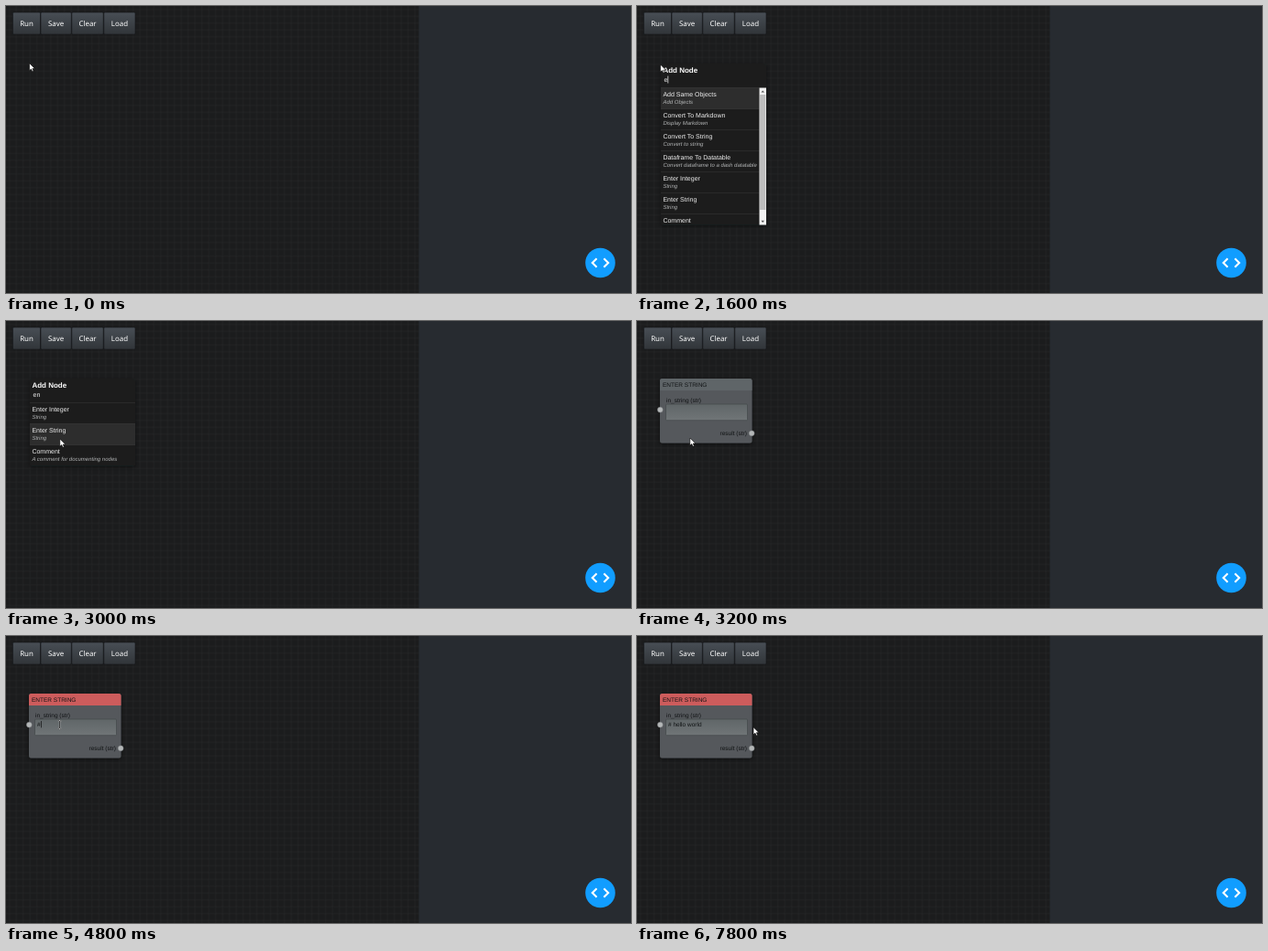
Animation of 682x314 px, one loop 8000 ms. Source, as an HTML page:

```html
<!DOCTYPE html>
<html lang="en">
<head>
<meta charset="utf-8">
<title>Node editor</title>
<style>
  html, body { margin: 0; width: 100%; height: 100%; overflow: hidden; background: #1b1c1d; }
  svg { display: block; width: 682px; height: 314px; }
  text { font: 7px "Liberation Sans", Arial, sans-serif; fill: #f0f0f0; text-rendering: geometricPrecision; white-space: pre; }
  .btn { font: 7.9px "Noto Sans", sans-serif; fill: #fff; text-anchor: middle; }
  .title { font-size: 8px; font-weight: bold; fill: #fff; }
  .hint { font-style: italic; fill: #6b6d6e; }
  .desc { font-size: 6px; font-style: italic; fill: #b2b4b5; }
  .node text { font-size: 6.5px; fill: #101314; }
  .hidden { display: none; }
</style>
</head>
<body>
<svg viewBox="0 0 682 314">
  <defs>
    <pattern id="grid" width="7.5" height="7.5" patternUnits="userSpaceOnUse">
      <path d="M3.75 0V7.5M0 3.75H7.5" stroke="#fff" stroke-opacity=".035" stroke-width=".9"/>
    </pattern>
    <linearGradient id="metal" x2="0" y2="1">
      <stop stop-color="#484e55"/><stop offset=".6" stop-color="#3a3f44"/><stop offset="1" stop-color="#313539"/>
    </linearGradient>
    <linearGradient id="field" x2="0" y2="1">
      <stop stop-color="#606668"/><stop offset="1" stop-color="#707577"/>
    </linearGradient>
    <filter id="shadow" x="-20%" y="-20%" width="140%" height="140%">
      <feDropShadow dx="0" dy="1.5" stdDeviation="2" flood-color="#000" flood-opacity=".45"/>
    </filter>
    <clipPath id="listClip"><path d="M26 89H141V239.5H26z"/></clipPath>
  </defs>

  <path fill="#1b1c1d" d="M0 0H451V314H0z"/>
  <path fill="url(#grid)" d="M0 0H451V314H0z"/>
  <path fill="#272b30" d="M450.5 0H682V314H450.5z"/>
  <g id="buttons"></g>

  <circle cx="648.5" cy="281" r="16.3" fill="#119dff"/>
  <path d="M644.6 276.2L639.8 281L644.6 285.8M652.4 276.2L657.2 281L652.4 285.8" fill="none" stroke="#fff" stroke-width="2.1"/>

  <g id="menu">
    <rect id="panel" x="26" y="63" width="115" rx="2" fill="#1b1e1f" filter="url(#shadow)"/>
    <text class="title" x="28.4" y="72.8">Add Node</text>
    <text id="filter" x="29.5" y="83.2"></text>
    <g id="list" clip-path="url(#listClip)"></g>
    <g id="scrollbar">
      <path fill="#f1f1f1" d="M133.5 89.5H141V239.5H133.5z"/>
      <rect id="thumb" x="134.1" y="97" width="6.3" fill="#bdbdbd"/>
      <path fill="#505050" d="M135.5 94.5L137.2 92.4L139 94.5zM135.5 234.8L137.2 236.9L139 234.8z"/>
    </g>
  </g>

  <g id="node" class="node">
    <rect x="25" y="63" width="100.5" height="70.5" rx="2.5" fill="#54595c" filter="url(#shadow)"/>
    <path id="header" d="M25 76V65.5Q25 63 27.5 63H123Q125.5 63 125.5 65.5V76z"/>
    <text x="28" y="71.7">ENTER STRING</text>
    <text x="32" y="89.2">in_string (str)</text>
    <rect x="31.5" y="91" width="89" height="17.7" rx="1" fill="url(#field)" stroke="#43484a" stroke-width=".7"/>
    <text id="value" x="34" y="99.2"></text>
    <text x="90.6" y="125.2">result (str)</text>
    <g fill="#b4b7b8" stroke="#85898b" stroke-width=".5">
      <circle cx="25.3" cy="97.1" r="2.9"/><circle cx="125.2" cy="122.8" r="2.9"/>
    </g>
  </g>

  <path id="caret" stroke-width=".7"/>
  <path id="arrow" d="M0 0V8.2L1.9 6.5L3.2 9.3L4.6 8.7L3.4 6H6z" fill="#fff" stroke="#000" stroke-width=".6"/>
  <g id="beam" fill="none">
    <path d="M.6 .6H1.8L2.5 1.2L3.2 .6H4.4M2.5 1.2V8.4M.6 9H1.8L2.5 8.4L3.2 9H4.4" stroke="#c4c7c8" stroke-width="1.5"/>
    <path d="M.6 .6H1.8L2.5 1.2L3.2 .6H4.4M2.5 1.2V8.4M.6 9H1.8L2.5 8.4L3.2 9H4.4" stroke="#111" stroke-width=".8"/>
  </g>
</svg>
<script>
const LOOP = 8000, ROW = 23, TOP = 89.5;
const $ = id => document.getElementById(id);
const show = (id, on) => $(id).classList.toggle("hidden", !on);

$("buttons").innerHTML = [["Run", 7.5, 30], ["Save", 38, 33.3], ["Clear", 71.8, 34.4], ["Load", 106.8, 34.2]]
  .map(([label, x, w]) =>
    `<rect x="${x}" y="7" width="${w}" height="24" rx="1.2" fill="url(#metal)" stroke="#15171a" stroke-width=".6"/>
     <text class="btn" x="${x + w / 2}" y="21.9">${label}</text>`).join("");

const options = [
  ["Add Async", "Add Numbers"], ["Add Same Objects", "Add Objects"], ["Add Sync", "Add Numbers"],
  ["Convert To Markdown", "Display Markdown"], ["Convert To String", "Convert to string"],
  ["Dataframe To Datatable", "Convert dataframe to a dash datatable"], ["Display", "Display"],
  ["Enter Integer", "String"], ["Enter String", "String"], ["Comment", "A comment for documenting nodes"]
];

function drawMenu({ query, hot }) {
  const found = options.filter(([name]) => name.toLowerCase().includes(query));
  const full = found.length * ROW, height = Math.min(full, 150), scrolls = full > 150;
  const right = scrolls ? 133.5 : 141;
  $("panel").setAttribute("height", TOP - 63 + height);
  $("filter").textContent = query || "Filter options";
  $("filter").setAttribute("class", query ? "" : "hint");
  $("list").innerHTML = found.map(([name, desc], i) => {
    const y = TOP + i * ROW;
    return `<path d="M26 ${y}H${right}V${y + ROW}H26z" fill="#fff" fill-opacity="${i === hot ? .075 : 0}"/>
      <path d="M26 ${y}H${right}" stroke="#fff" stroke-opacity=".11" stroke-width=".6"/>
      <text x="28.4" y="${y + 9.2}">${name}</text><text class="desc" x="28.4" y="${y + 17.9}">${desc}</text>`;
  }).join("");
  show("scrollbar", scrolls);
  // the list really holds a few more options than fit the drawn rows
  $("thumb").setAttribute("height", query ? 126 : 73.5);
}

// Each step lists only what changes; caret is an x position, 0 when off.
const steps = [
  [0, { view: "", query: "", hot: 0, value: "", caret: 0, picked: false, cursor: "arrow", x: 25.5, y: 62.5 }],
  [200, { view: "menu", caret: 30 }],
  [600, { y: 64 }],
  [1000, { caret: 0 }],
  [1600, { query: "e", caret: 33.8 }],
  [1800, { query: "en", caret: 37.5 }],
  [2200, { caret: 0 }],
  [2400, { cursor: "beam", x: 30.7, y: 81.2 }],
  [2600, { cursor: "arrow", x: 42.5, y: 132.5, hot: 1 }],
  [2800, { caret: 37.5, x: 58.8, y: 129 }],
  [3000, { caret: 0 }],
  [3200, { view: "node", x: 57.8, y: 128 }],
  [3400, { y: 106.5 }],
  [3600, { cursor: "beam", x: 56.1, y: 92.2 }],
  [3800, { picked: true, caret: 34.3 }],
  [4200, { caret: 0 }],
  [4800, { value: "#", caret: 38.5 }],
  [5400, { value: "# hel", caret: 48.7 }],
  [6000, { value: "# hello", caret: 54.6 }],
  [6400, { value: "# hello w", caret: 59.7 }],
  [6600, { value: "# hello wor", caret: 65.5 }],
  [6800, { value: "# hello world", caret: 70.8 }],
  [7400, { caret: 0, x: 80.9, y: 93.2 }],
  [7600, { cursor: "arrow", x: 127, y: 99.7 }]
];

function draw(s) {
  const inMenu = s.view === "menu";
  show("menu", inMenu);
  show("node", s.view === "node");
  if (inMenu) drawMenu(s);
  $("header").setAttribute("fill", s.picked ? "#cd5c5c" : "#5f6568");
  $("value").textContent = s.value;
  show("caret", s.caret);
  $("caret").setAttribute("d", inMenu ? `M${s.caret} 76.5V84.5` : `M${s.caret} 93V100.3`);
  $("caret").setAttribute("stroke", inMenu ? "#fff" : "#111");
  for (const id of ["arrow", "beam"]) show(id, s.cursor === id);
  $(s.cursor).setAttribute("transform", `translate(${s.x} ${s.y})`);
}

let last = 0;
function tick() {
  const t = performance.now() % LOOP;
  const past = steps.filter(([at]) => at <= t);
  if (past.length !== last) {
    last = past.length;
    draw(Object.assign({}, ...past.map(step => step[1])));
  }
  requestAnimationFrame(tick);
}
tick();
</script>
</body>
</html>
```
